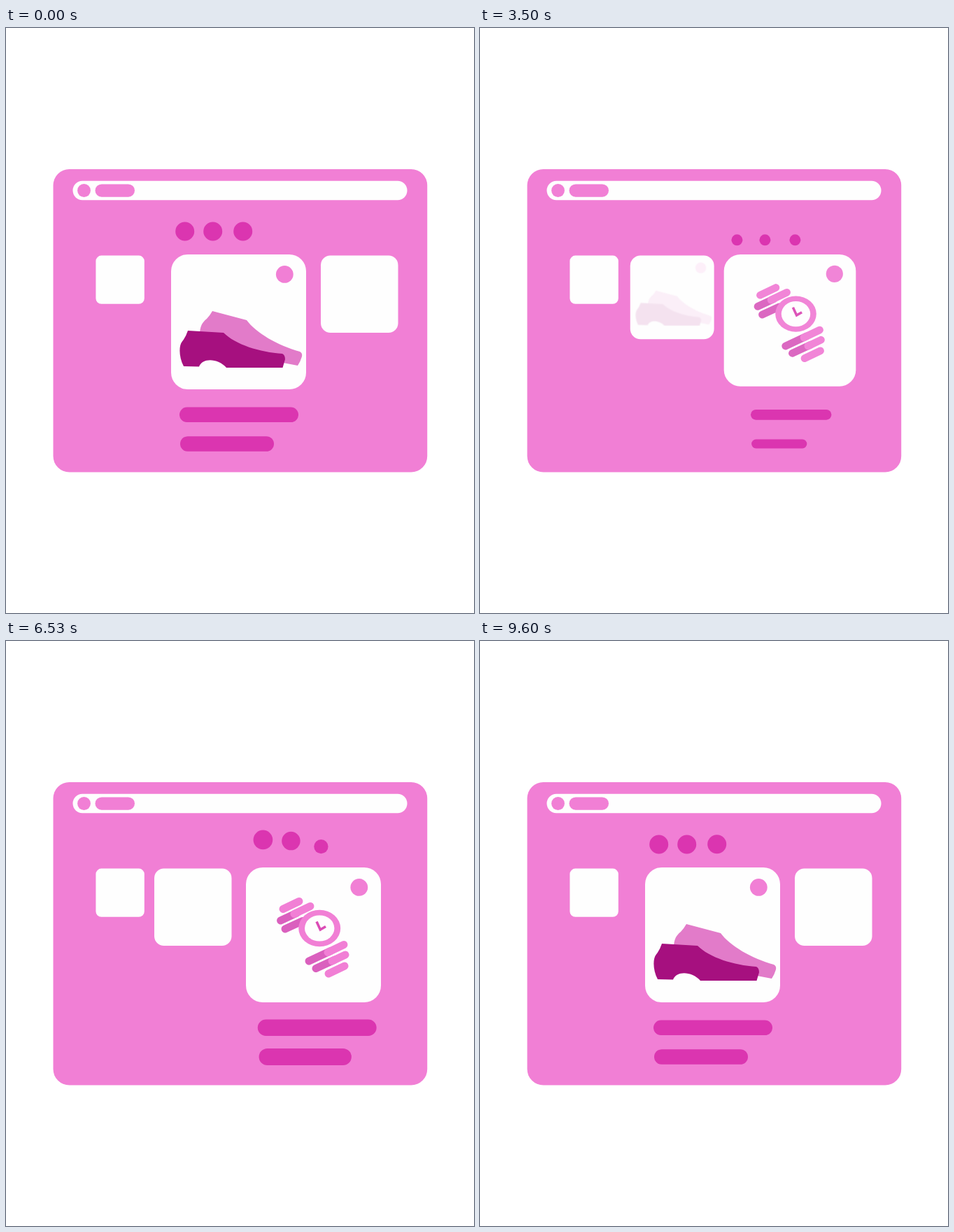
Recreate the animation shown at these times as an HTML page. Size 669x837 px, loop 9.66 s.

```html
<!DOCTYPE html>
<html lang="en">
<head>
<meta charset="utf-8">
<title>Shop carousel</title>
<style>
  html, body { margin: 0; width: 100%; height: 100%; overflow: hidden; background: #fff; }
  svg { display: block; width: 669px; height: 837px; }
  .pink { fill: #f17fd5; }
  .white { fill: #fefefe; }
  .deep { fill: #db35b0; }
  .strap { fill: none; stroke-width: 11; stroke-linecap: round; }
</style>
</head>
<body>
<svg viewBox="0 0 669 837">
  <rect class="pink" x="67.5" y="202" width="534.7" height="433.6" rx="23"/>
  <rect class="white" x="95.5" y="218.8" width="478" height="27.4" rx="13.7"/>
  <circle class="pink" cx="111.5" cy="232.5" r="9.4"/>
  <rect class="pink" x="127.5" y="223.4" width="56.5" height="18.4" rx="9.2"/>
  <rect class="white" x="128.4" y="325.6" width="69.4" height="69.2" rx="8"/>

  <g id="marks" class="deep"></g>

  <g id="shoeCard">
    <rect class="white" width="193" height="193" rx="24"/>
    <g id="shoe">
      <circle class="pink" cx="162.3" cy="28.4" r="12.4"/>
      <g transform="translate(-236 -324)">
        <path fill="#e27bc9" d="M277 436C278 425 281 421 287 416Q291 412 295 405L344 418C357 436 388 454 420 463Q424 465 423 470Q421 477 417 483L396 479Z"/>
        <path fill="#a6107f" d="M260 433L311 436C328 453 363 464 395 466Q399 468 399 474L395.500 486H315C304 473 281 471 276 484.500L254 484C247 471 247 455 251.500 449Q257 442 260 433Z"/>
      </g>
    </g>
  </g>

  <g id="watchCard">
    <rect class="white" width="193" height="193" rx="24"/>
    <g id="watch">
      <circle class="pink" cx="161.8" cy="28.400" r="12.4"/>
      <g transform="translate(-343 -324)">
        <path class="strap" stroke="#da60be" d="M392.500 400L416 389M399 412L424 400.500M433 458L464 443.500M443 468.500L470 456"/>
        <path class="strap" stroke="#f17fd5" d="M396 383.500L419 372.500M412 390.500L435 379.500M460 445.500L483 434.500M466 458L485 449M461 476L484 465"/>
        <ellipse class="pink" cx="448.200" cy="411" rx="30" ry="26.200"/>
        <ellipse class="white" cx="448.200" cy="411" rx="21.200" ry="18.600"/>
        <path fill="none" stroke="#db4bb5" stroke-width="3.600" d="M444 401.500L449.300 413L457 408.500"/>
      </g>
    </g>
  </g>
</svg>
<script>
const FPS = 30, TOTAL = 290, HALF = TOTAL / 4, LOOP = 9660;
const LEAVE = 27;
const $ = id => document.getElementById(id);
const set = (el, attrs) => { for (const k in attrs) el.setAttribute(k, attrs[k]); };

const span = (f, from, len) => Math.min(1, Math.max(0, (f - from) / len));
const smooth = u => u * u * (3 - 2 * u);
const easeOut = u => 1 - (1 - u) ** 3;
const lerp = (a, b, u) => a + (b - a) * u;

const make = tag => $('marks').appendChild(
  document.createElementNS('http://www.w3.org/2000/svg', tag));

// One set of dots and bars under each of the two card places.
const DOTS = [255.7, 295.7, 338.7];
const BARS = [
  { x: 333, y: 553.3, w: 170, out: 9.7, pop: 35, peak: 27, widen: 38.5 },
  { x: 316, y: 595, w: 134, out: 8.6, pop: 36, peak: 27.5, widen: 40.5 }
];
const BAR_H = 21.6, DOT_R = 13.5;
const sides = [0, 111.7].map(dx => ({
  dx,
  dots: DOTS.map(() => make('circle')),
  bars: BARS.map(() => make('rect'))
}));

function drawDot(el, x, y, r) {
  set(el, { cx: x, cy: y, r: Math.max(0, r) });
}

function drawBar(el, x, y, w, h) {
  set(el, { x: x - w / 2, y: y - h / 2, width: w, height: h, rx: h / 2 });
}

function leave(side, f) {
  const e = span(f, LEAVE, 8.6) ** 2;
  DOTS.forEach((x, i) =>
    drawDot(side.dots[i], x + side.dx, 291 + 30 * e, DOT_R * (1 - e)));
  BARS.forEach((b, i) => {
    const s = 1 - span(f, LEAVE, b.out) ** 2;
    drawBar(side.bars[i], b.x + side.dx, b.y, b.w * s, BAR_H * s);
  });
}

function enter(side, f) {
  DOTS.forEach((x, i) => {
    const start = 38 + 4 * i;
    const rise = easeOut(span(f, start, 14));
    const settle = smooth(span(f, start + 14, 12));
    drawDot(side.dots[i], x + side.dx,
      321 - 36.6 * rise + 6.6 * settle,
      DOT_R * rise * lerp(1.025, 1, settle));
  });
  BARS.forEach((b, i) => {
    const grow = b.peak * easeOut(span(f, b.pop, 8));
    const h = grow - (b.peak - BAR_H) * smooth(span(f, b.pop + 8, 13));
    const w = lerp(h, b.w, easeOut(span(f, b.widen, 14)));
    drawBar(side.bars[i], b.x + side.dx, b.y, w, h);
  });
}

// size: 0 = small card, 1 = large card
function drawCard(card, art, smallX, largeX, size) {
  const x = lerp(smallX, largeX, size);
  const y = lerp(325.6, 324, size);
  const scale = lerp(110.5, 193, size) / 193;
  set(card, { transform: `translate(${x} ${y}) scale(${scale})` });
  set(art, { opacity: size });
}

function draw(t) {
  const n = Math.floor(t * FPS / 1000 + 0.12) % TOTAL;
  const half = Math.floor(n / HALF);
  const f = n - half * HALF;
  const back = half % 2;

  leave(sides[back], f);
  enter(sides[1 - back], f);

  const grow = smooth(span(f, 30.4, 10));
  const shrink = 1 - smooth(span(f, 31.2, 9.3));
  drawCard($('shoeCard'), $('shoe'), 212, 236, back ? grow : shrink);
  drawCard($('watchCard'), $('watch'), 450, 343, back ? shrink : grow);
}

let start;
function tick(now) {
  start ??= now;
  draw((now - start) % LOOP);
  requestAnimationFrame(tick);
}
draw(0);
requestAnimationFrame(tick);
</script>
</body>
</html>
```
